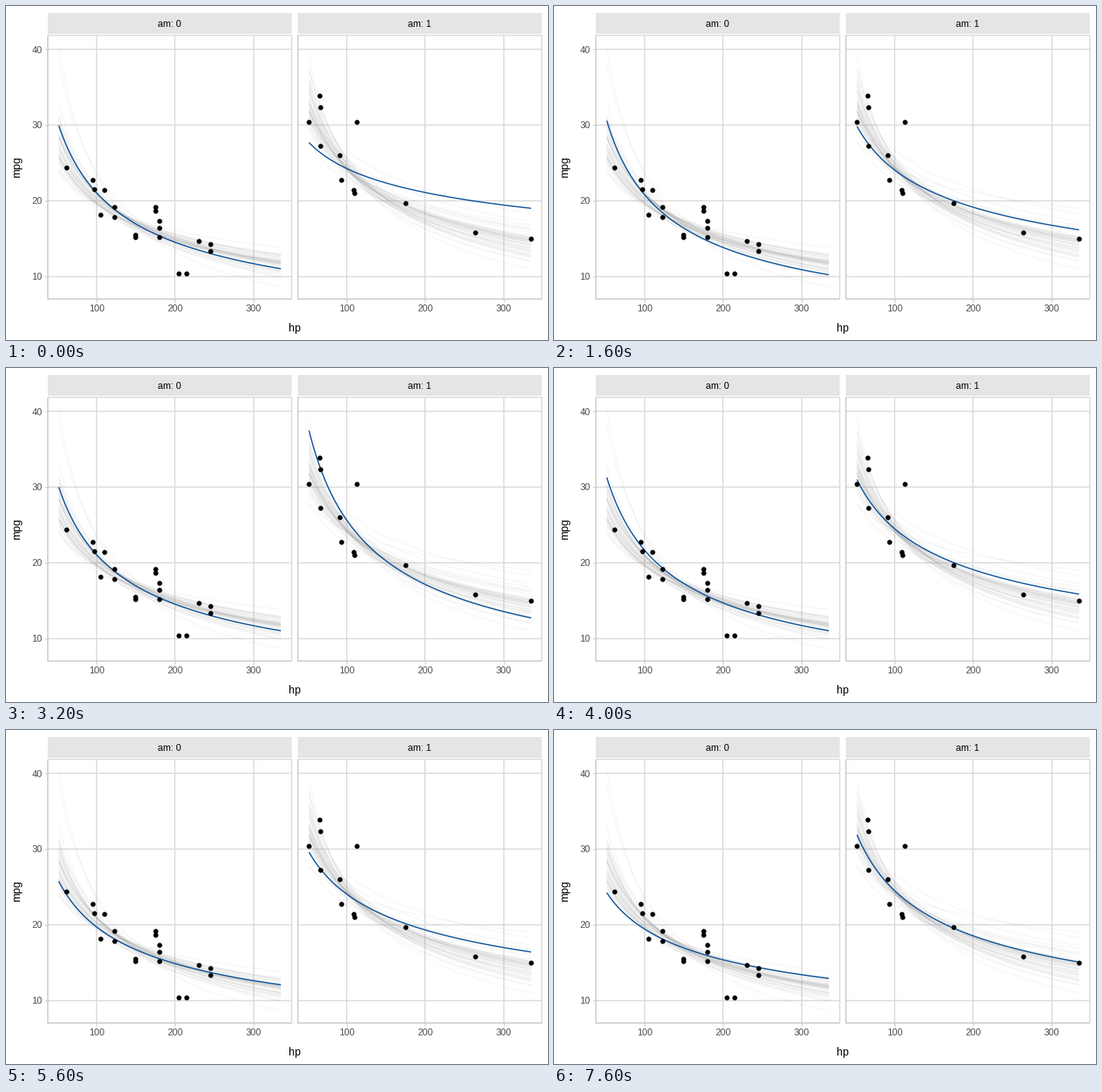
Recreate the animation shown at these times as a matplotlib script. Size 700x432 px, loop 8000 ms.

```python
import numpy as np
import matplotlib.pyplot as plt
from matplotlib.animation import FuncAnimation
from matplotlib.collections import LineCollection
from matplotlib.patches import Rectangle

W, H, DPI = 700, 432, 100
HOLD_MS = 400
PX = 72 / DPI  # points per pixel
HP_MIN, HP_MAX = 52, 335
PANELS = [(53.5, 368.7), (377.2, 692.0)]
TOP, BOTTOM = 38, 379
FONT = "Liberation Sans"
GRID, AXIS = "#d9d9d9", "#c6c6c6"

CARS = [
    [(110, 21.4), (175, 18.7), (105, 18.1), (245, 14.3), (62, 24.4),
     (95, 22.8), (123, 19.2), (123, 17.8), (180, 16.4), (180, 17.3),
     (180, 15.2), (205, 10.4), (215, 10.4), (230, 14.7), (97, 21.5),
     (150, 15.5), (150, 15.2), (245, 13.3), (175, 19.2)],
    [(110, 21), (93, 22.8), (66, 32.4), (52, 30.4), (65, 33.9), (66, 27.3),
     (91, 26), (113, 30.4), (264, 15.8), (175, 19.7), (335, 15), (109, 21.4)],
]

# Each draw: mpg at the lowest and highest hp, for the left and right panel.
DRAWS = [
    (29.95, 11.0, 27.7, 19.0), (29.95, 11.0, 27.7, 19.0),
    (28.5, 11.9, 33.0, 14.0), (28.5, 11.8, 31.8, 14.5),
    (30.6, 10.2, 29.85, 16.15), (30.0, 11.0, 37.1, 12.8),
    (26.9, 12.05, 32.7, 18.3), (27.5, 12.2, 32.3, 14.5),
    (30.0, 11.0, 37.5, 12.7), (28.5, 11.8, 31.0, 15.0),
    (31.3, 11.0, 31.0, 15.85), (28.8, 11.7, 31.7, 14.8),
    (30.5, 10.75, 35.1, 13.4), (29.5, 11.1, 32.5, 14.2),
    (25.75, 12.05, 29.6, 16.4), (33.0, 9.9, 34.5, 13.5),
    (31.2, 11.6, 33.3, 13.25), (31.0, 10.6, 37.5, 12.5),
    (27.0, 12.2, 33.5, 13.8), (24.25, 12.9, 31.9, 15.05),
]
EXTREMES = [(40.4, 8.6, 39.0, 11.0), (38.3, 9.9, 36.2, 12.1),
            (23.8, 13.8, 29.0, 16.8)]


def px_x(hp, panel):
    return 116.8 + (hp - 100) * 1.0135 + (323.2 if panel else 0)


def px_y(mpg):
    return 349.6 - (mpg - 10) * 9.773


def curve(draw, panel):
    start, end = draw[2 * panel:2 * panel + 2]
    hp = np.linspace(HP_MIN, HP_MAX, 101)
    slope = np.log(end / start) / np.log(HP_MAX / HP_MIN)
    return px_x(hp, panel), px_y(start * (hp / HP_MIN) ** slope)


def random_draws(count):
    rng = np.random.default_rng(4)

    def ends(pivot, level, level_sd, slope, slope_sd):
        b = slope + slope_sd * np.clip(rng.normal(), -1.9, 1.9)
        a = level * np.exp(level_sd * np.clip(rng.normal(), -1.8, 1.8))
        return a * (pivot / HP_MIN) ** b, a * (pivot / HP_MAX) ** b

    return [ends(150, 16.8, .025, .46, .055) + ends(105, 23.7, .035, .44, .075)
            for _ in range(count)]


def line(x, y, color, width, z):
    return ax.plot(x, y, color=color, lw=width * PX, zorder=z,
                   solid_capstyle="butt")[0]


def label(x, y, text, size, color="black", ha="center", **kw):
    ax.text(x, y, text, fontsize=size * PX, color=color, ha=ha,
            va="baseline", family=FONT, **kw)


fig = plt.figure(figsize=(W / DPI, H / DPI), dpi=DPI, facecolor="white")
ax = fig.add_axes([0, 0, 1, 1])
ax.set_xlim(0, W)
ax.set_ylim(H, 0)
ax.axis("off")

ghosts = DRAWS[1:] + EXTREMES + random_draws(28)
blue = []
for panel, (left, right) in enumerate(PANELS):
    ax.add_patch(Rectangle((left, 9), right - left, 27, fc="#e5e5e5", lw=0))
    label((left + right) / 2, 27, f"am: {panel}", 12)
    for hp in (100, 200, 300):
        x = px_x(hp, panel)
        line([x, x], [TOP, BOTTOM], GRID, 1.5, 1)
        line([x, x], [BOTTOM, BOTTOM + 3.5], AXIS, 1, 1)
        label(x, 395.3, str(hp), 12, "#4d4d4d")
    for mpg in (10, 20, 30, 40):
        y = px_y(mpg)
        line([left, right], [y, y], GRID, 1.5, 1)
        if panel == 0:
            line([left - 3.5, left], [y, y], AXIS, 1, 1)
            label(47, y + 4.3, str(mpg), 12, "#4d4d4d", "right")
    ax.add_collection(LineCollection(
        [np.column_stack(curve(d, panel)) for d in ghosts],
        colors="#909090", alpha=.065, linewidths=1.5 * PX, zorder=2))
    blue.append(line([], [], "#08519c", 1.5, 3))
    hp, mpg = np.array(CARS[panel]).T
    ax.scatter(px_x(hp, panel), px_y(mpg), s=(6.4 * PX) ** 2, c="black",
               lw=0, zorder=4)
    line([left, right, right], [TOP, TOP, BOTTOM], GRID, 1.5, 5)
    line([left, left, right], [TOP, BOTTOM, BOTTOM], AXIS, 1.5, 5)

label(373, 420.5, "hp", 14)
label(18.5, 208, "mpg", 14, rotation=90, rotation_mode="anchor")


def update(i):
    for panel, artist in enumerate(blue):
        artist.set_data(*curve(DRAWS[i], panel))
    return blue


anim = FuncAnimation(fig, update, frames=len(DRAWS), interval=HOLD_MS,
                     repeat=True, repeat_delay=0)
plt.show()
```
